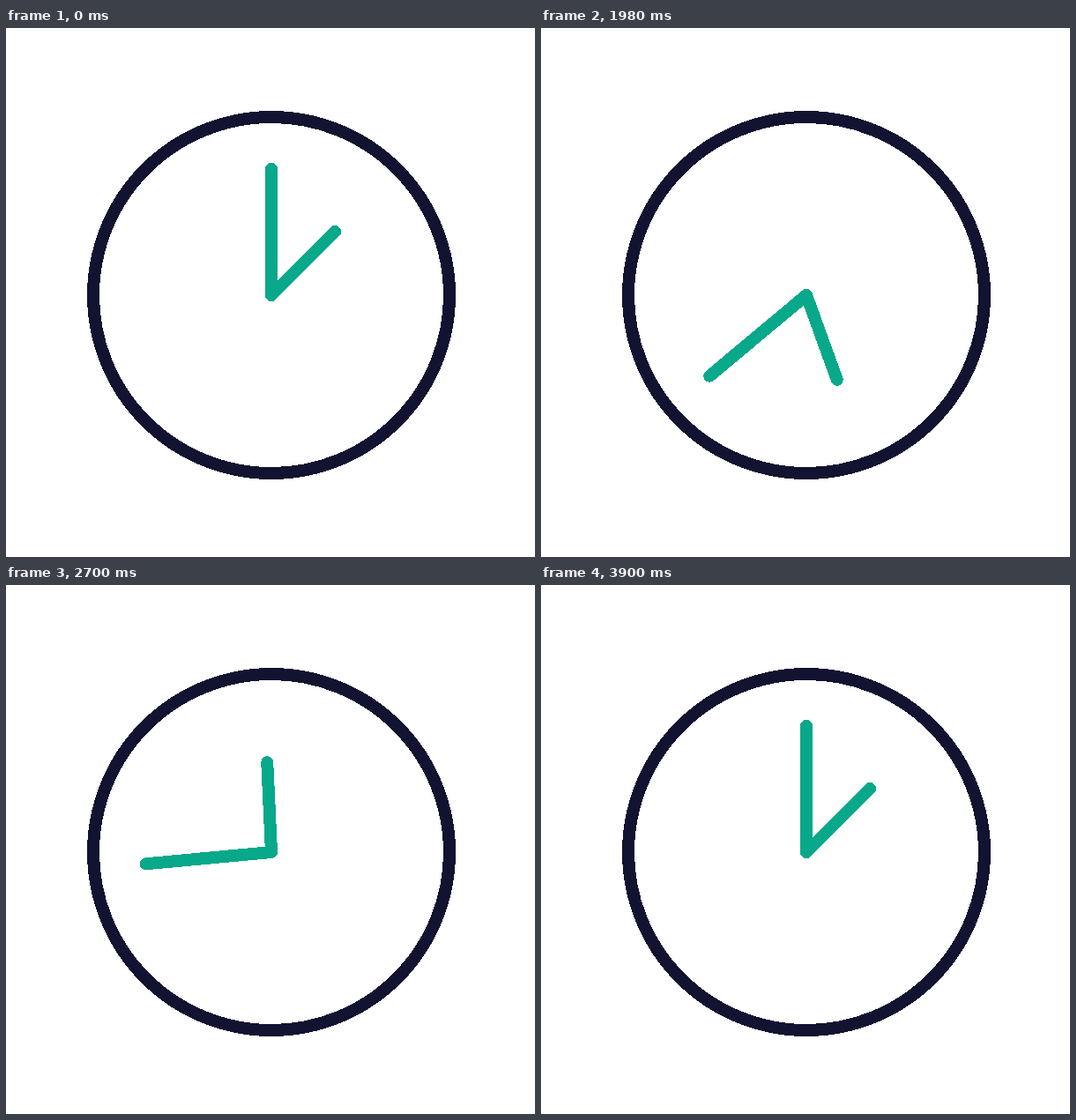
These frames come from a looping animation (600 px wide and 600 px high, 3.99 s). An HTML page without scripts:

```html
<!DOCTYPE html>
<html lang="en">
<head>
<meta charset="utf-8">
<title>Clock</title>
<style>
  @property --u {
    syntax: "<number>";
    inherits: true;
    initial-value: 0;
  }

  html, body {
    margin: 0;
    width: 100%;
    height: 100%;
    overflow: hidden;
    background: #fff;
  }

  svg {
    display: block;
    width: 100%;
    height: 100%;
    fill: none;
    stroke-width: 14;
    stroke-linecap: round;
    shape-rendering: crispEdges;
  }

  .ring { stroke: #121331; }

  /* Easing cubic-bezier(1/3, 0, 0, 1) sampled every 30 ms:
     solve s - 2s² + 2s³ = u for s, then progress = 3s² - 2s³. */
  .hands {
    stroke: #08a88a;
    animation: turn 3990ms infinite;
    --h: calc(var(--u) / 4 - 5 / 108);
    --root: sqrt(var(--h) * var(--h) + 1 / 5832);
    --s: calc(1 / 3 + pow(var(--root) + var(--h), 1 / 3) - pow(var(--root) - var(--h), 1 / 3));
    --progress: calc(var(--s) * var(--s) * (3 - 2 * var(--s)));
  }

  .minute { transform: rotate(calc(var(--progress) * 720deg)); }
  .hour { transform: rotate(calc(45deg + var(--progress) * 360deg)); }

  @keyframes turn {
    0% { --u: 0; animation-timing-function: step-end; }
    37.57% { --u: 0; animation-timing-function: steps(80, end); }
    97.72%, 100% { --u: 1; }
  }
</style>
</head>
<body>
<svg viewBox="0 0 600 600">
  <g transform="translate(301 303)">
    <circle class="ring" r="202"/>
    <g class="hands">
      <path class="minute" d="M0 0V-143"/>
      <path class="hour" d="M0 0V-102"/>
    </g>
  </g>
</svg>
</body>
</html>
```
